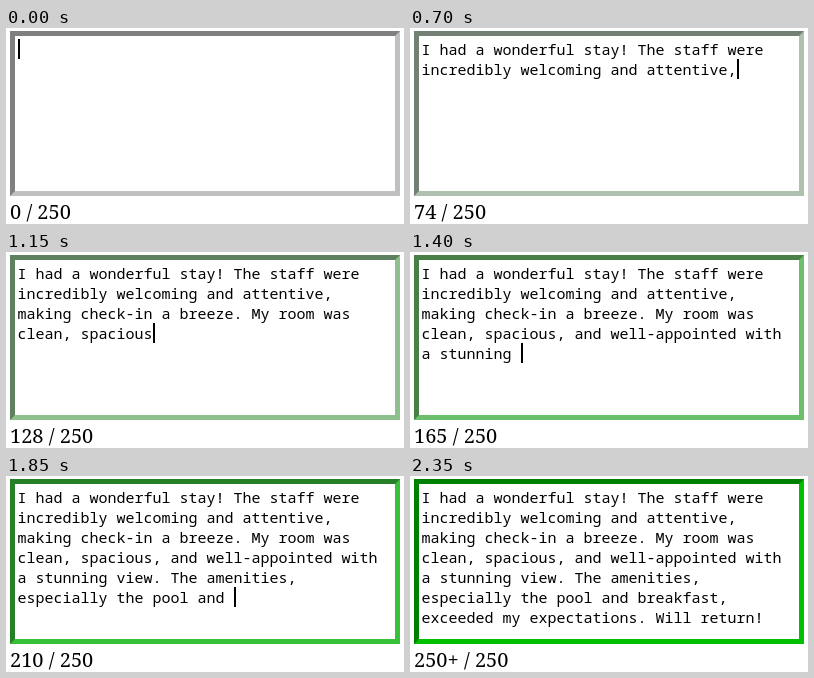
Write an HTML page with a canvas that moves like this. It is 398 px wide and 196 px high and loops after 3200 ms.

```html
<!DOCTYPE html>
<html lang="en">
<head>
<meta charset="utf-8">
<title>Character counter</title>
<style>
  html, body { margin: 0; width: 100%; height: 100%; overflow: hidden; background: #fff; }
  canvas { display: block; }
</style>
</head>
<body>
<canvas id="stage" width="398" height="196"></canvas>
<script>
const ctx = document.getElementById('stage').getContext('2d');

const LOOP = 3200, TICK = 50, CARET_OFF = 2350;
const LIMIT = 250, COLUMNS = 41, CHAR = 9, LINE = 20;
const BOX = { left: 4, top: 3, right: 394, bottom: 168, border: 5 };
const REVIEW = 'I had a wonderful stay! The staff were incredibly welcoming and ' +
  'attentive, making check-in a breeze. My room was clean, spacious, and ' +
  'well-appointed with a stunning view. The amenities, especially the pool ' +
  'and breakfast, exceeded my expectations. Will return!';

// Typing pace: [tick, characters typed]
const PACE = [[0, 0], [8, 42], [17, 99], [22, 128], [27, 165], [36, 210], [44, REVIEW.length]];

function typedAt(time) {
  const tick = Math.max(0, Math.floor(time / TICK) - 1);
  for (let i = 1; i < PACE.length; i++) {
    const [t0, n0] = PACE[i - 1], [t1, n1] = PACE[i];
    if (tick <= t1) return Math.round(n0 + (n1 - n0) * (tick - t0) / (t1 - t0));
  }
  return REVIEW.length;
}

function wrap(text) {
  const lines = [''];
  for (const word of text.match(/\S+\s*|\s+/g) || []) {
    const last = lines.length - 1;
    if (lines[last].length + word.trimEnd().length > COLUMNS) lines.push(word);
    else lines[last] += word;
  }
  return lines;
}

function fillPath(color, points) {
  ctx.fillStyle = color;
  ctx.beginPath();
  points.forEach(([x, y]) => ctx.lineTo(x, y));
  ctx.fill();
}

function drawBorder(green) {
  const { left: l, top: t, right: r, bottom: b, border: w } = BOX;
  const tint = level => {
    const fade = Math.round(level * (1 - green));
    return `rgb(${fade}, ${level}, ${fade})`;
  };
  ctx.fillStyle = tint(192);
  ctx.fillRect(l, t, r - l, b - t);
  fillPath(tint(128), [[l, t], [r, t], [r - w, t + w], [l + w, t + w], [l + w, b - w], [l, b]]);
  ctx.fillStyle = '#fff';
  ctx.fillRect(l + w, t + w, r - l - 2 * w, b - t - 2 * w);
}

function draw(time) {
  const count = typedAt(time);
  const lines = wrap(REVIEW.slice(0, count));

  ctx.fillStyle = '#fff';
  ctx.fillRect(0, 0, 398, 196);
  drawBorder(Math.min(1, count / LIMIT) ** 2);

  ctx.fillStyle = '#000';
  ctx.font = '15px "Noto Sans Mono", monospace';
  lines.forEach((line, i) => ctx.fillText(line, 11.5, 27 + i * LINE));

  if (time < CARET_OFF) {
    const row = lines.length - 1;
    ctx.fillRect(12 + lines[row].length * CHAR, 11 + row * LINE, 2, LINE);
  }

  ctx.font = '20px "Noto Serif", serif';
  ctx.fillText(`${count > LIMIT ? LIMIT + '+' : count} / ${LIMIT}`, 4, 191);
}

const start = performance.now();
function frame() {
  draw((performance.now() - start) % LOOP);
  requestAnimationFrame(frame);
}
frame();
</script>
</body>
</html>
```
